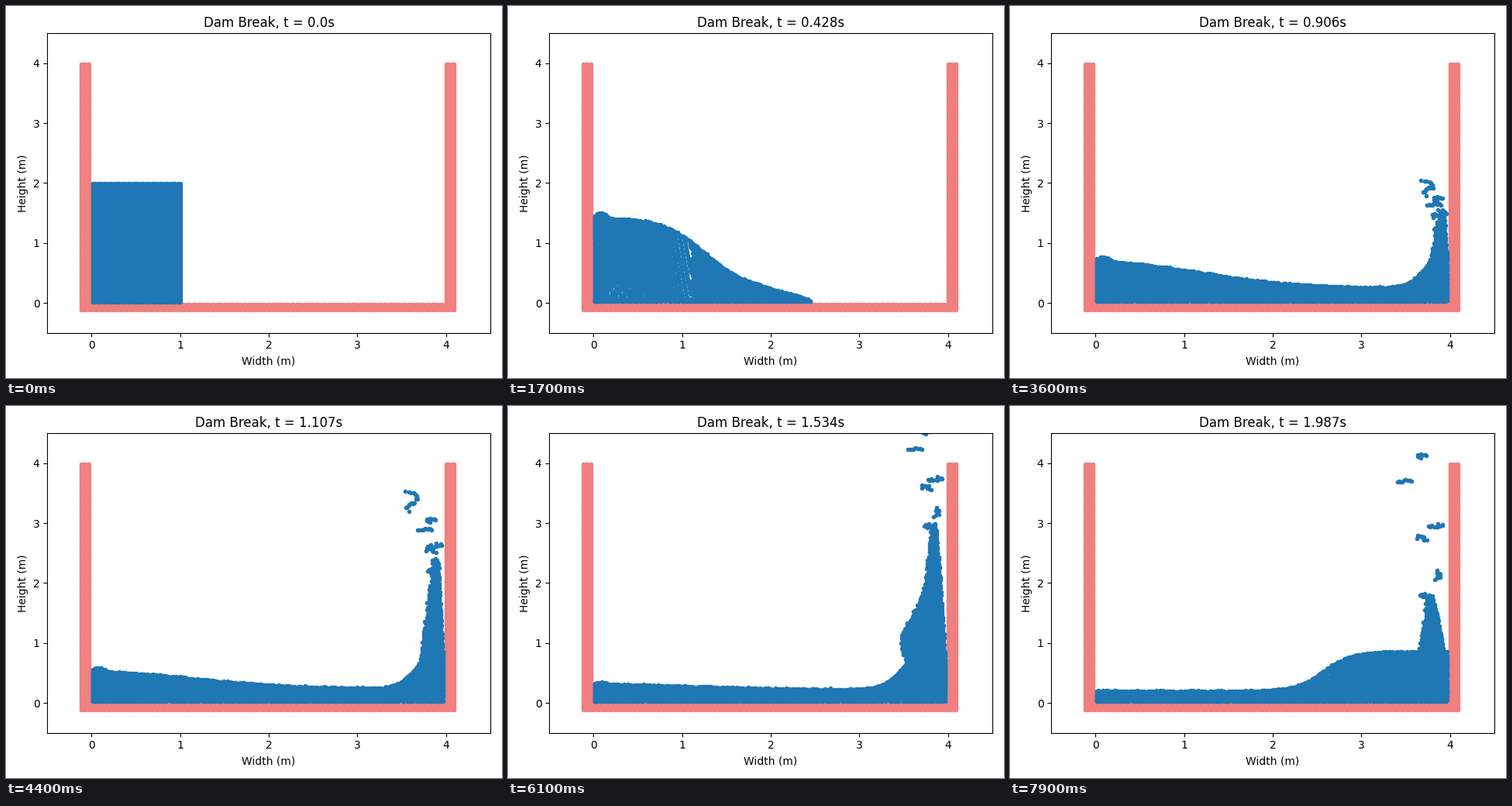
These frames come from a looping animation (640x480 px, 8 s). A matplotlib script:

```python
import numpy as np
import matplotlib.pyplot as plt
from matplotlib.animation import FuncAnimation

FRAMES, STEP, DT = 80, 100, 0.025155
DX = 0.03
LEFT, RIGHT, FLOOR = 0.015, 3.965, 0.025
IMPACT = 28          # the front reaches the right wall
JET_BASE = 0.2
GRAVITY = 9.81 * DT ** 2

# Splash drops: where each one is at DROP_TIME.
DROP_TIME = 61
DROPS = [(3.27, 4.97), (3.35, 5.31), (3.63, 4.24), (3.75, 4.52), (3.86, 3.73),
         (3.75, 3.6), (3.87, 3.18), (3.77, 2.95), (3.78, 2.33)]

rng = np.random.default_rng(7)
COUNT = 2500
index = np.arange(COUNT)
MIXED = ((index + .5) / COUNT, index * (np.sqrt(5) - 1) / 2 % 1)
MIXED_NOISE = rng.normal(0, .005, (COUNT, 2))
EDGE_NOISE = rng.normal(0, 1, (1500, 2))

cols, rows = np.meshgrid(np.arange(34), np.arange(67), indexing="ij")
BLOCK = np.column_stack([cols.ravel(), rows.ravel()]) * DX + DX / 2
GRID = ((cols.ravel() + .5) / 34, (rows.ravel() + .5) / 67)


def clump(size=10):
    """A short winding chain of particles around the origin."""
    angle = rng.uniform(0, np.pi) + np.cumsum(rng.normal(0, .6, size))
    pts = .02 * np.cumsum(np.column_stack([np.cos(angle), np.sin(angle)]), axis=0)
    return pts - pts.mean(axis=0) + rng.normal(0, .01, (size, 2))


CLUMPS = [clump() for _ in DROPS]


def bell(x, center, width):
    return np.exp(-((x - center) / width) ** 2)


def front(n):
    return 1.01 + .18 * (np.hypot(n, 14) - 14)


def surface(x, n):
    """Water height: sinking column, thin toe, wall bump, returning bore."""
    t = n * DT
    u = min(n / 25, 1)
    high = 2 / (1 + (t / .653) ** 2)
    low = min(.28 - .04 * t, high)
    width = 1.01 + .61 * u ** 1.3
    power = 1 / (.015 + .485 * u ** 1.8)
    taper = .42 * (front(n) - 1)
    toe = np.clip((front(n) - x) / min(taper, .6), 0, 1) ** .6
    h = low * toe + (high - low) * np.exp(-(x / width) ** power)
    s = t / .6
    h += .11 * (s * np.exp(1 - s)) ** 2 * bell(x, .08, .09)
    if n > IMPACT:
        late = max(n - 58, 0)
        center = 3.75 - .008 * (n - 32) - .0083 * late ** 1.5
        steep = .1 + .003 * late
        rise = .66 * min((n - IMPACT) / 8, 1)
        h += rise / (1 + np.exp((center - x) / steep))
    return np.maximum(h, FLOOR)


def jet(n):
    """Heights with the left and right edges of the jet at the wall."""
    m = n - IMPACT
    top = JET_BASE + 2.8 * np.sin(np.pi * m / 61) ** .8
    y = np.linspace(JET_BASE, top, 400)
    f = (y - JET_BASE) / (top - JET_BASE)
    tip = 3.91 - .003 * m
    left = tip - .2 * (1 - f) ** 1.3 - .21 * bell(n, 60, 9) * bell(y, 1.05, .5)
    right = RIGHT - (RIGHT - tip - .04) * f ** 1.6
    return y, left, right


def drops(n):
    d = n - DROP_TIME
    for (x, y), shape in zip(DROPS, CLUMPS):
        # All drops left the same spot, so speed follows from position.
        cx = x + (x - 3.89) / 33 * d
        cy = y + .027 * (y - 3.27) * d - GRAVITY * d * d / 2
        if cy > .3:
            yield shape + (cx, cy)


def cumulate(x, y):
    return np.r_[0, np.cumsum(np.diff(x) * (y[1:] + y[:-1]) / 2)]


def along(px, py, noise):
    """Evenly spaced particles on a polyline."""
    s = np.r_[0, np.cumsum(np.hypot(np.diff(px), np.diff(py)))]
    at = np.arange(0, s[-1], DX * .8)
    pts = np.column_stack([np.interp(at, s, px), np.interp(at, s, py)])
    return pts + EDGE_NOISE[:len(at)] * noise


class Shape:
    """The water region at one time, filled by area fraction and depth."""

    def __init__(self, n):
        self.x = np.linspace(0, min(front(n), RIGHT), 1200)
        self.h = surface(self.x, n)
        self.body = cumulate(self.x, self.h)
        self.total = self.body[-1]
        self.has_jet = n > IMPACT
        if self.has_jet:
            self.y, self.left, self.right = jet(n)
            self.jet = cumulate(self.y, self.right - self.left)
            self.total += self.jet[-1]

    def place(self, s, v):
        area = np.clip(s, 0, 1) * self.total
        x = np.interp(area, self.body, self.x)
        y = FLOOR + v * (np.interp(x, self.x, self.h) - FLOOR)
        if self.has_jet:
            up = area > self.body[-1]
            jy = np.interp(area - self.body[-1], self.jet, self.y)
            lo = np.interp(jy, self.y, self.left)
            hi = np.interp(jy, self.y, self.right)
            x = np.where(up, lo + v * (hi - lo), x)
            y = np.where(up, jy, y)
        return np.column_stack([x, y])

    def edges(self):
        end = self.x[-1]
        outline = along(np.r_[0, self.x, end, 0], np.r_[FLOOR, self.h, FLOOR, FLOOR], .005)
        parts = [outline]
        if self.has_jet:
            parts += [along(self.left, self.y, .014), along(self.right, self.y, .006)]
        return parts


def water(n):
    if n == 0:
        return BLOCK
    shape = Shape(n)

    # Particles keep their columns in the upper left until the flow mixes them.
    depth = .04 * max(n - 15, 1)

    def ordered(p):
        return (p[:, 0] < 1.1) & (p[:, 1] > depth)

    mixed = shape.place(*MIXED) + MIXED_NOISE
    s, v = GRID
    lean = .1 * min(n / 17, 1)
    grid = shape.place(s + lean * (.5 - v) * np.sin(np.pi * s), v)
    parts = [mixed[~ordered(mixed)], grid[ordered(grid)], *shape.edges()]
    if shape.has_jet:
        parts += drops(n)
    pts = np.vstack(parts)
    pts[:, 0] = np.clip(pts[:, 0], LEFT, RIGHT)
    pts[:, 1] = np.maximum(pts[:, 1], FLOOR)
    return pts


def block(xs, ys):
    gx, gy = np.meshgrid(xs, ys)
    return np.column_stack([gx.ravel(), gy.ravel()])


layers = np.arange(4) * DX
heights = np.arange(-.12, 4.0, DX)
walls = np.vstack([
    block(layers - .12, heights),
    block(layers + 4, heights),
    block(np.arange(0, 4, DX), layers - .12),
])

fig, ax = plt.subplots(figsize=(6.4, 4.8), dpi=100)
ax.plot(*walls.T, ".", color="lightcoral")
fluid, = ax.plot(*BLOCK.T, ".", color="tab:blue")
ax.set(xlim=(-.5, 4.5), ylim=(-.5, 4.5), xlabel="Width (m)", ylabel="Height (m)")
ax.set_xticks(range(5))
ax.set_yticks(range(5))
title = ax.set_title("Dam Break, t = 0.0s")
fig.tight_layout()
fig.subplots_adjust(top=.9267)


def update(n):
    fluid.set_data(*water(n).T)
    title.set_text(f"Dam Break, t = {round(n * DT, 3)}s")
    return fluid, title


anim = FuncAnimation(fig, update, frames=FRAMES, interval=STEP,
                     init_func=lambda: update(0), repeat=True, repeat_delay=0)
plt.show()
```
